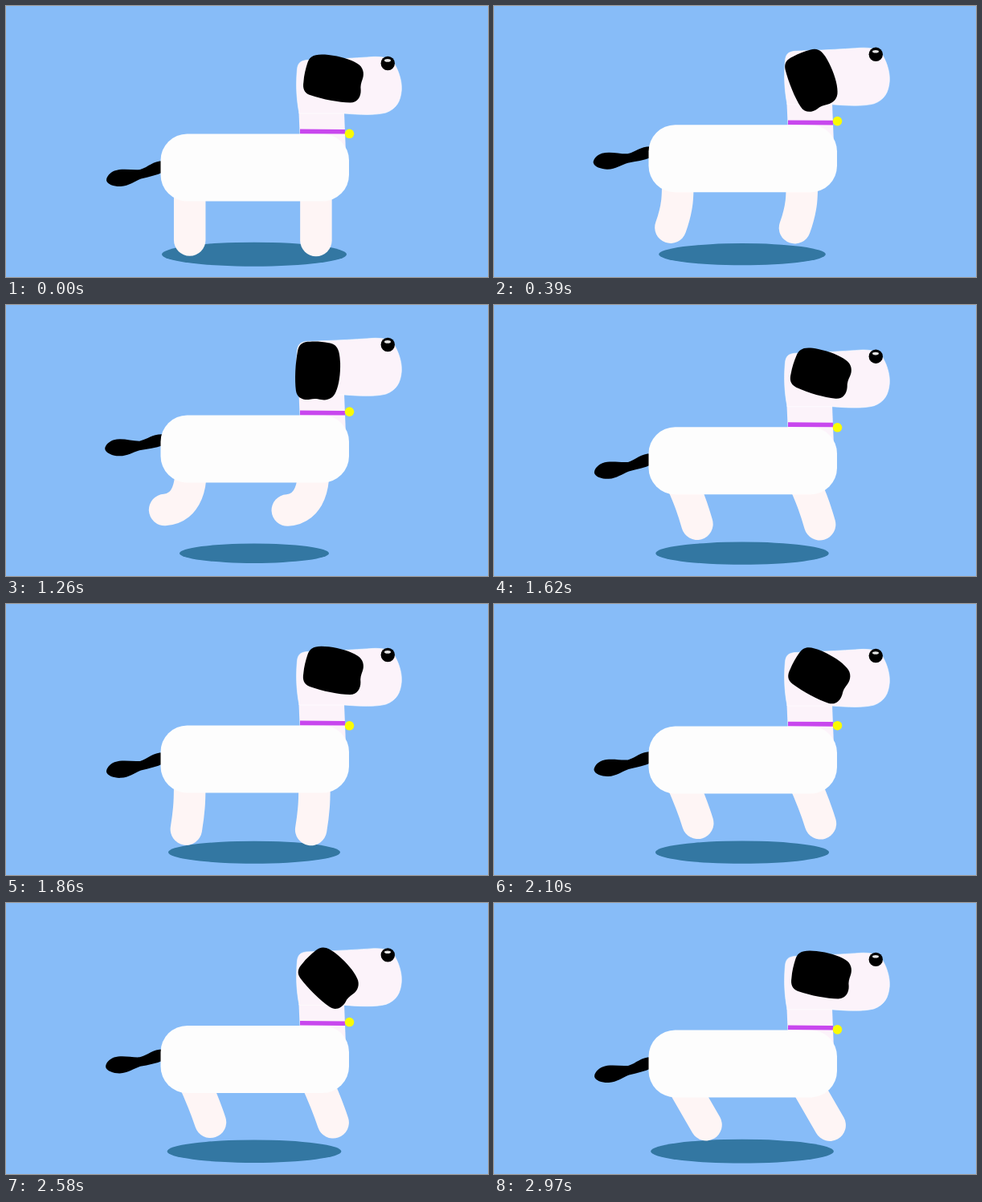
An HTML page that plays this animation: 600 px wide and 338 px high, repeating every 3 s.

```html
<!DOCTYPE html>
<html lang="en">
<head>
<meta charset="utf-8">
<title>Trotting dog</title>
<style>
  html, body { margin: 0; width: 100%; height: 100%; overflow: hidden; background: #87bcf8; }
  svg { display: block; width: 100%; height: 100%; }
  .leg { fill: none; stroke: #fef5f5; stroke-width: 39.5; stroke-linecap: round; }
  .skin { fill: #fcf3fa; }
</style>
</head>
<body>
<svg viewBox="0 0 600 338" preserveAspectRatio="none">
  <ellipse id="shadow" cx="309" cy="309.7" fill="#3377a2"/>
  <!-- y = 0 is the top of the back -->
  <g id="dog">
    <path id="backLeg" class="leg"/>
    <path id="frontLeg" class="leg"/>
    <path id="tail" d="M196 33.5C182 34 178 41 167 44.5C157 45.500 145 42.500 135 46C129 48.500 125 53.500 125 58C126 63.500 136 66 143 65.500C153 65 160 59 168 56C178 53.500 188 51.500 196 47.500Z"/>
    <path class="skin" d="M364.5 -27L421 -27L423 24L390 30L366 10Z"/>
    <rect x="192.5" width="234.5" height="84" rx="33" fill="#fdfdfd"/>
    <path d="M366 -3.1L422 -2.7" stroke="#c847ee" stroke-width="5.6"/>
    <circle id="bell" cx="427.5" r="5.8" fill="#fafb03"/>
    <path class="skin" stroke="#fff" stroke-width=".6" d="M365 -25.5C361 -47 361 -64 362.500 -81C363.500 -88 366 -91 374 -92L400 -93C425 -94 440 -95 455 -96C470 -97 479 -94 484 -86.500C490 -76 493 -64 492.300 -54.500C491 -40 486 -31.500 473 -26.500C460 -23 440 -24 421 -25.500Z"/>
    <g id="ear">
      <path transform="translate(388.2 -76)" d="M-10 -15.5C-2 -16.2 6 -15.5 13 -14.5C23 -13 27 -8 28 10C28.6 24 27 38 23 47C20 55 12 58 5 56.5C0 55.5 -4 55 -9 56.5C-17 58 -25 55 -26.5 46C-28.5 32 -28 12 -25 -5C-23 -13 -18 -15.5 -10 -15.5Z"/>
    </g>
    <circle cx="475.3" cy="-88" r="8.7"/>
    <ellipse cx="475" cy="-91.6" rx="4" ry="1.8" fill="#e4e4e4"/>
  </g>
</svg>
<script>
const LOOP = 3000, STEP = 30;
const STRIDE = 484, SWING = 466.7, JINGLE = 264;
const PEAK = .61;
const RAD = Math.PI / 180;

const set = (id, attrs) => {
  const el = document.getElementById(id);
  for (const name in attrs) el.setAttribute(name, attrs[name]);
};

// Smooth step from 0 at a to 1 at b
function ease(a, b, p) {
  const x = Math.min(1, Math.max(0, (p - a) / (b - a)));
  return x * x * (3 - 2 * x);
}

// Up from a to b, down from c to d
const pulse = (a, b, c, d, p) => ease(a, b, p) - ease(c, d, p);

// A curve leaving the hip at one angle and reaching the foot at another
function legPath(x, y, hipAngle, footAngle, length) {
  const point = (px, py, angle, r) => [px + r * Math.sin(angle * RAD), py + r * Math.cos(angle * RAD)];
  const chord = hipAngle + .37 * (footAngle - hipAngle);
  const foot = point(x, y, chord, length);
  const knee = point(x, y, hipAngle, length * .4);
  const ankle = point(...foot, footAngle, -length * .42);
  return `M${x} ${y}C${knee} ${ankle} ${foot}`;
}

function draw(t) {
  const p = t / STRIDE % 1;
  const jump = p < PEAK ? (p / PEAK) ** 2 : 1 - ease(PEAK, 1, p);
  const h = 22.5 * jump;
  set("dog", { transform: `translate(0 ${159.5 - h})` });
  set("shadow", { rx: 115 - h, ry: (115 - h) * .131 });

  const hip = 30 * pulse(0, .13, .13, .85, p);
  const foot = hip - 100 * jump ** 2.3;
  const tuck = pulse(0, .22, .65, 1, p);
  const length = 75.5 - 7 * tuck;
  set("backLeg", { d: legPath(228.7, 57, hip, foot, length) });
  set("frontLeg", { d: legPath(385.9 - 4.5 * tuck, 57.5, hip, foot, length) });

  const swing = pulse(.44, .64, .74, 1, t / SWING % 1);
  set("tail", { transform: `rotate(${5.3 * swing} 300 30)` });
  set("ear", { transform: `rotate(${82 * swing - 81} 389.9 -73.6)` });
  set("bell", { cy: 3.2 * Math.cos((t - 30) / JINGLE * 2 * Math.PI) - 2.6 });
}

const start = performance.now();
function tick() {
  const t = (performance.now() - start) % LOOP;
  draw(Math.floor(t / STEP) * STEP);
  requestAnimationFrame(tick);
}
tick();
</script>
</body>
</html>
```
